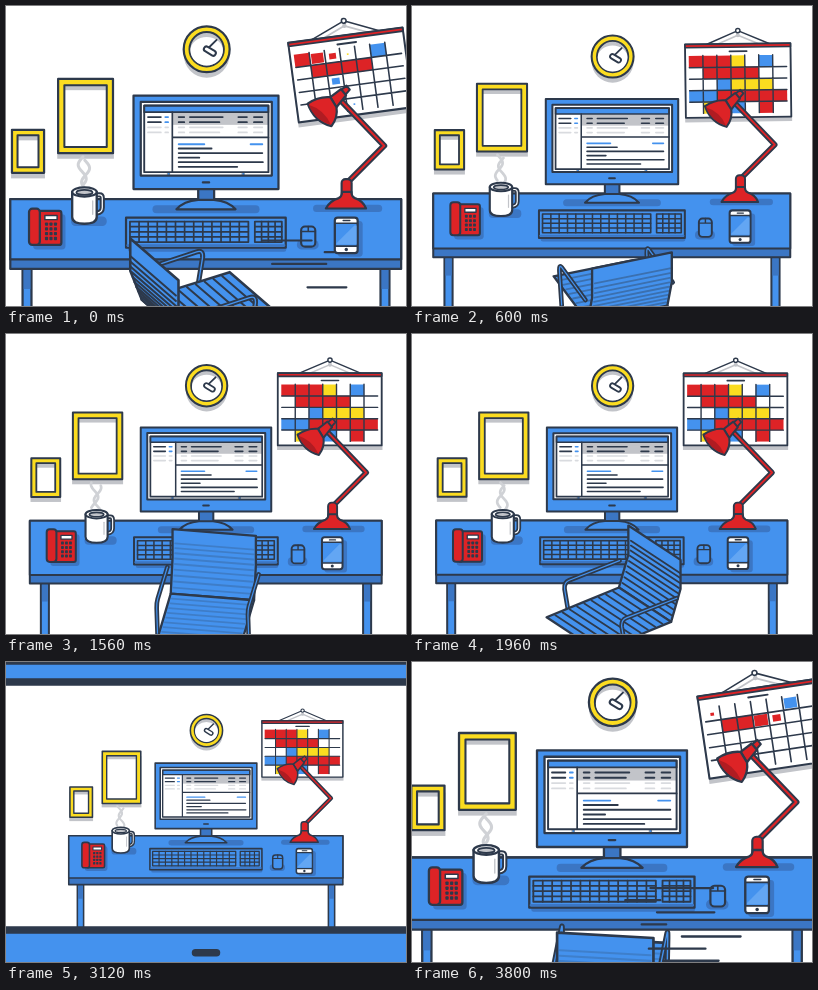
An HTML page for the animation above (3.88 s loop, 400 by 300 pixels).

```html
<!DOCTYPE html>
<html lang="en">
<head>
<meta charset="utf-8">
<title>Desk</title>
<style>
html, body { margin: 0; width: 100%; height: 100%; overflow: hidden; background: #fff; }
svg { display: block; width: 100vw; height: 100vh; }
</style>
</head>
<body>
<svg id="stage" viewBox="0 0 400 300"></svg>
<script>
// The camera pulls back out of a monitor that shows the same desk: NEST is the size of the desk on the screen
const LOOP = 3880, SWITCH = 2800, NEST = 0.2085, CX = 200, CY = 128;
const INK = '#2d394b', BLUE = '#4492ee', DEEP = '#3b76c4', RED = '#dd2326',
      YELLOW = '#fbdc20', GREY = '#c2c4c9', PALE = '#d9dbdf', WHITE = '#fff';
const HUES = { R: RED, B: BLUE, Y: YELLOW };

const clamp = (v, a = 0, b = 1) => Math.min(b, Math.max(a, v));
const mix = (a, b, p) => a + (b - a) * p;
const ease = (a, b, t) => { const p = clamp((t - a) / (b - a)); return p * p * (3 - 2 * p); };

function random(seed) {
  return () => (seed = seed * 16807 % 2147483647) / 2147483647;
}

// Monotone cubic through [time, value] keys
function curve(keys) {
  const n = keys.length - 1, slope = [], m = [0];
  for (let i = 0; i < n; i++)
    slope.push((keys[i + 1][1] - keys[i][1]) / (keys[i + 1][0] - keys[i][0]));
  for (let i = 1; i < n; i++) {
    const a = slope[i - 1], b = slope[i];
    m.push(a * b > 0 ? 2 * a * b / (a + b) : 0);
  }
  m.push(0);
  return t => {
    if (t <= keys[0][0]) return keys[0][1];
    if (t >= keys[n][0]) return keys[n][1];
    let i = 0;
    while (t > keys[i + 1][0]) i++;
    const h = keys[i + 1][0] - keys[i][0], p = (t - keys[i][0]) / h, q = 1 - p;
    return keys[i][1] * (1 + 2 * p) * q * q + keys[i + 1][1] * (3 - 2 * p) * p * p
      + h * (m[i] * p * q * q - m[i + 1] * p * p * q);
  };
}

// Motion; times are relative to the scene's own zero
const zoom = curve([[-1080, -Math.log(NEST)], [-760, 1.322], [-400, .329], [-80, .143],
  [0, .109], [600, .0184], [1200, .006], [2800, 0]]);
const swing = u => 9 * Math.exp(-(((u + 400) / 800) ** 4)) * Math.cos(Math.PI * (u + 400) / 350);
const unroll = u => ease(-620, -200, u);
const openWin = u => u < -640 ? 0 : 60 * (1 - Math.exp(-(u + 640) / 120));
const spin = u => (149 + (u < 0 ? .66 * u : 620 * (1 - Math.exp(-u / 1000)))) * Math.PI / 180;
const sink = u => 120 * (ease(2200, 2720, u) + 1 - ease(-760, -420, u));

// Drawing helpers
const box = (x, y, x2, y2, fill, line = 2, r = 0, more = '') =>
  `<rect x="${x}" y="${y}" width="${x2 - x}" height="${y2 - y}" rx="${r}" fill="${fill}"` +
  (line ? ` stroke="${INK}" stroke-width="${line}"` : '') + ` ${more}/>`;
const path = (d, fill = 'none', line = 2, color = INK, more = '') =>
  `<path d="${d}" fill="${fill}" stroke="${color}" stroke-width="${line}" ${more}/>`;
const disc = (x, y, r, fill, line = 2) =>
  `<circle cx="${x}" cy="${y}" r="${r}" fill="${fill}" stroke="${INK}" stroke-width="${line}"/>`;
const oval = (x, y, rx, ry, fill, line) =>
  `<ellipse cx="${x}" cy="${y}" rx="${rx}" ry="${ry}" fill="${fill}" stroke="${INK}" stroke-width="${line}"/>`;
const dash = (x, x2, y, color = INK, w = 1.6) => path(`M${x} ${y}H${x2}`, 'none', w, color);
const tube = (d, outer, core, color) => path(d, 'none', outer) + path(d, 'none', core, color);

function clock() {
  return `<circle cx="200.6" cy="57" r="20.6" fill="${GREY}"/>` + disc(200.6, 52, 20.6, YELLOW) +
    disc(200.6, 52, 15.4, GREY, 1.8) +
    `<path d="M186 53a14.6 12 0 0 1 29.2 0a14.5 13.5 0 0 1-29.2 0" fill="${WHITE}"/>` +
    path('M201 52L209.5 43.6', 'none', 1.7) + tube('M200.4 51.8L206.5 55.5', 6.4, 2.8, WHITE);
}

function frame(x, y, x2, y2, w) {
  return box(x - .8, y + 6, x2 + .8, y2 + 5, GREY, 0) + box(x, y, x2, y2, YELLOW) +
    box(x + w, y + w, x2 - w, y2 - w, WHITE, 0) +
    box(x + w, y + w, x2 - w, y + w + 4.5, GREY, 0) +
    box(x + w, y + w, x2 - w, y2 - w, 'none', 1.8);
}

const PLAN = ['RRRY.B.', '.RRRR..', '..BYYY.', 'BBRRRRR', '.YYB.R.'];
const ROW_START = [-100, -245, 95, 250, 100];

function calendar(id) {
  let cells = '', lines = '';
  PLAN.forEach((row, r) => [...row].forEach((c, i) => {
    if (c === '.') return;
    const at = ROW_START[r] + 30 * i - (c === 'B' ? 200 : 0);
    cells += `<rect class="cell" x="-7" y="-5.8" width="14" height="11.6" fill="${HUES[c]}"
      data-x="${282 + 13.7 * i}" data-y="${56.6 + 11.3 * r}" data-at="${at}"/>`;
  }));
  for (let i = 1; i < 7; i++) lines += `M${275.2 + 13.7 * i} 50.5V107.5`;
  for (let i = 1; i < 5; i++) lines += `M275.5 ${51 + 11.3 * i}H371`;
  return `<clipPath id="grid${id}"><rect class="gridclip" x="270" y="44" width="106" height="0"/></clipPath>` +
    '<g class="cal">' + path('M293 44L323.5 31L354 44', 'none', 1.6, GREY) + disc(323.5, 31, 2, GREY, 0) +
    path('M293 39.5L323.5 26.5L354 39.5', 'none', 1.4) + disc(323.5, 26.5, 2.1, WHITE, 1.4) +
    box(270.8, 44, 375.8, 44, GREY, 0, 0, 'class="paper"') +
    box(271.5, 39.5, 375, 39.5, WHITE, 1.8, 0, 'class="paper"') + cells +
    `<g clip-path="url(#grid${id})">${path(lines, 'none', 1.4)}</g>` +
    box(271.5, 39.5, 375, 42.7, RED, 1.6) + dash(315, 332, 46.8) + '</g>';
}

function desk() {
  const leg = x => box(x, 249, x + 8, 320, BLUE) + box(x + 1, 249, x + 7, 267, DEEP, 0);
  return leg(35.5) + leg(356.5) + box(24.5, 186.5, 375, 249, DEEP) + box(24.5, 186.5, 375, 240.5, BLUE);
}

function keyboard() {
  const block = (x, x2, n) => {
    let d = '';
    for (let i = 1; i < 4; i++) d += `M${x} ${206.5 + i * 4.6}H${x2}`;
    for (let i = 1; i < n; i++) d += `M${mix(x, x2, i / n)} 206.5V224.9`;
    return box(x, 206.5, x2, 224.9, BLUE, 1.6) + path(d, 'none', 1.5);
  };
  return box(130, 206, 272, 233.5, DEEP, 0, 2) + box(128.3, 203, 271.5, 230, BLUE) +
    path('M129.6 227.8H270.2', 'none', 2, DEEP) + block(131.8, 238, 13) + block(243.8, 268, 4);
}

function phone() {
  let keys = '';
  for (let r = 0; r < 4; r++)
    for (let c = 0; c < 3; c++) keys += box(55.6 + c * 4, 207.3 + r * 4.3, 58.4 + c * 4, 210.3 + r * 4.3, INK, 0, .7);
  return box(45, 200, 74, 231.5, DEEP, 0, 3) + box(47, 197, 70.3, 227.5, RED, 2, 2) +
    box(41.3, 195, 51, 227.5, RED, 2, 3) + box(55.5, 201, 66.5, 204.8, WHITE, 1.3) + keys;
}

function mug() {
  return box(79, 202, 111, 210.5, DEEP, 0, 4) + path('', 'none', 2.7, '#d0d2d6', 'class="steam"') +
    tube('M102 182.5h2.6q2.4 0 2.4 3v8.5q0 4.5-5 5', 4.6, 1.1, WHITE) +
    path('M80 180V202.5q0 6 11 6t11-6V180z', WHITE, 2.1) + path('M98.4 188V200', 'none', 1.2, GREY) +
    oval(91, 180, 11, 4.2, WHITE, 2) + oval(91, 180.4, 7.2, 2.2, GREY, 1.6);
}

function gadgets() {
  return box(281.5, 223, 301, 231.5, DEEP, 0, 4) + box(285.3, 211, 298, 229, BLUE, 1.9, 3.5) +
    path('M285.3 215.5H298M291.7 211V215.5', 'none', 1.4) +
    box(318, 206, 340.5, 238, DEEP, 0, 3) + box(315.5, 203, 336, 234.8, WHITE, 2, 2.6) +
    box(315.8, 208, 335.7, 228.5, BLUE, 1.5) + path('M317 226L333 210h2V227H317z', '#63a6f3', 0) +
    dash(323, 329, 205.6, INK, 1.3) + disc(325.8, 231.6, 1.5, INK, 0);
}

function lamp() {
  return box(296, 191.5, 358, 198, DEEP, 0, 3.2) + tube('M326.3 172L359.8 138.5L321 98', 5.4, 1.9, RED) +
    box(321.6, 168.5, 330.6, 188, RED, 1.9, 3.5) +
    path('M307.5 194.8Q311 188 319 185.5Q322 184 322 180H330.4Q330.4 184 333.5 185.5Q341 188 343.5 194.8z', RED) +
    path('M320 89.5L326 84.6L329 88.2L324 94z', RED, 1.8) +
    path('M311.5 95L321 87.7L325.6 93.2L317 104z', RED) +
    path('M291.2 100.7Q301 94 311.5 95L317 104Q318.5 113 312.5 121Q297 117 291.2 100.7z', RED) +
    path('M292 101.8Q306 106 312 119.8Q298 116 292 101.8z', '#b01c22', 0);
}

function mail() {
  let s = box(145, 108.5, 256, 165, WHITE, 0) + box(169.8, 109, 256, 119.8, GREY, 0) +
    box(144.6, 102.5, 256, 108.4, BLUE, 1.5);
  for (let i = 0; i < 4; i++) {
    const y = 112.8 + 4.6 * i, c = i < 2 ? INK : PALE;
    s += dash(148, 159.5, y, c) + dash(163.5, 166, y, i < 2 ? BLUE : PALE) + dash(175.5, 180.5, y, c) +
      dash(185.6, i % 2 ? 212 : 215, y, c) + dash(229, 236.7, y, c) + dash(243, 250.5, y, c);
  }
  s += path('M169.8 108.4V165M169.8 131H256', 'none', 1.5) +
    dash(175.5, 198.5, 137.2, BLUE) + dash(240, 250.5, 137.2, BLUE);
  [205, 250.5, 194, 251, 228].forEach((x, i) => s += dash(175.5, x, 141 + i * 4.1));
  return s;
}

function monitor(id, nested) {
  return box(152, 192, 248, 199, DEEP, 0, 3.5) + box(193, 176, 207.3, 190, DEEP) +
    path('M173.5 195.5Q180 188 193 187H207Q220 188 226.5 195.5z', BLUE) +
    box(135, 93.6, 265, 177.4, BLUE) + box(141.5, 99.2, 259, 165.3, WHITE, 0) +
    `<clipPath id="screen${id}"><rect x="141.5" y="99.2" width="117.5" height="66.1"/></clipPath>` +
    `<clipPath id="win${id}"><rect class="view" x="143" y="101" width="114.5" height="0"/></clipPath>` +
    `<g clip-path="url(#screen${id})"><g transform="translate(${CX} ${CY}) scale(${NEST}) translate(${-CX} ${-CY})">${nested}</g>` +
    `<g clip-path="url(#win${id})">${mail()}</g>` + box(144.6, 102.5, 256, 103, 'none', 1.7, 0, 'class="edge"') + '</g>' +
    box(141.5, 99.2, 259, 165.3, 'none') + path('M197.2 171.4H202.8', 'none', 2);
}

const scene = (id, nested) =>
  clock() + frame(67.4, 78.6, 116.6, 145.2, 5.6) + frame(26, 124.2, 54.8, 162.8, 5) + calendar(id) +
  desk() + monitor(id, nested) + keyboard() + phone() + mug() + gadgets() + lamp() +
  '<g class="chair"></g>' + path('', 'none', 2, INK, 'class="dashes"');

// Swivel chair: a points to its back, b across it, z up from the seat
function chair(u) {
  const turn = spin(u), cos = Math.cos(turn), sin = Math.sin(turn), drop = sink(u);
  const at = (a, b, z) => [200 + a * cos - b * sin, 284 + drop + .52 * (a * sin + b * cos) - z];
  const line = pts => 'M' + pts.map(p => p.map(v => v.toFixed(2)).join(' ')).join('L');
  const half = 42, strength = clamp(cos * cos * 1.8);

  const panel = (point, from, count) => {
    let ribs = '';
    for (let k = from; k < count; k++) ribs += line([point(k / count, -half * .94), point(k / count, half * .94)]);
    const edge = line([point(0, -half), point(0, half), point(.5, half), point(1, half),
      point(1, -half), point(.5, -half)]) + 'z';
    return path(edge, BLUE, 2.3) + path(ribs, 'none', 1.8, INK, `opacity="${mix(.2, 1, strength)}"`);
  };
  const back = panel((p, b) => at(mix(54, 42, p) + 6 * Math.sin(p * Math.PI), b, 58 * (1 - p)), 3, 12);
  const seat = panel((p, b) => at(mix(42, -50, p), b, 0), 1, 10);
  const arm = side => {
    const b = side * 46;
    return tube(line([at(46, b, 24), at(-18, b, 25)]) + `Q${at(-25, b, 25)} ${at(-24, b, 18)}L${at(-18, b, -12)}`, 4.6, 1.2, BLUE);
  };
  const far = cos > 0 ? -1 : 1;
  return sin < 0 ? arm(far) + back + seat + arm(-far) : arm(far) + seat + arm(-far) + back;
}

// Speed lines fly right; the head slows down while the tail catches up
function streaks(u) {
  const rnd = random(77);
  let d = '';
  for (let i = 0; i < 7; i++) {
    const y = 213 + 10.5 * i, a = mix(200, 225, rnd()), b = mix(305, 342, rnd());
    const p = (u - mix(-190, -100, rnd())) / 170;
    if (p > 0 && p < 1) d += `M${mix(a, b, p * p)} ${y}H${mix(a, b, 1 - (1 - p) ** 2)}`;
  }
  return d;
}

function steam(t) {
  let d = '';
  for (const side of [-1, 1])
    for (let y = 175; y >= 150; y--) {
      const x = 90.5 + side * (1.5 + 3.6 * Math.sin(y / 4 + t / LOOP * Math.PI * 6));
      d += `${y === 175 ? 'M' : 'L'}${x.toFixed(2)} ${y + side * 1.5}`;
    }
  return d;
}

const stage = document.getElementById('stage');
stage.innerHTML = `<rect width="400" height="300" fill="${WHITE}"/>` +
  `<g id="outer" stroke-linecap="round" stroke-linejoin="round">${scene('A', '<g id="inner">' + scene('B', '') + '</g>')}</g>`;
const outer = document.getElementById('outer'), inner = document.getElementById('inner');

function parts(nested) {
  const all = c => [...outer.querySelectorAll('.' + c)].filter(e => inner.contains(e) === nested);
  const found = { cells: all('cell'), papers: all('paper') };
  for (const c of ['cal', 'gridclip', 'steam', 'view', 'edge', 'chair', 'dashes']) found[c] = all(c)[0];
  return found;
}
const near = parts(false), far = parts(true);

function update(e, u, t) {
  e.cal.setAttribute('transform', `rotate(${swing(u)} 323.5 26.5)`);
  const fall = unroll(u);
  for (const p of e.papers) p.setAttribute('height', 72 * fall);
  e.gridclip.setAttribute('height', 64 * clamp(fall * 1.8 - .7));
  for (const c of e.cells) {
    const k = clamp((u - c.dataset.at) / 90);
    c.setAttribute('transform', `translate(${c.dataset.x} ${c.dataset.y}) scale(${k})`);
  }
  const h = openWin(u);
  e.view.setAttribute('height', h ? h + 1.5 : 0);
  e.edge.setAttribute('height', h);
  e.edge.style.display = h ? '' : 'none';
  e.steam.setAttribute('d', steam(t));
  e.chair.innerHTML = u < 2720 ? chair(u) : '';
  e.dashes.setAttribute('d', streaks(u));
}

function draw(t) {
  const u = t < SWITCH ? t : t - LOOP;
  outer.setAttribute('transform', `translate(${CX} ${CY}) scale(${Math.exp(zoom(u))}) translate(${-CX} ${-CY})`);
  update(near, u, t);
  update(far, u + LOOP, t);
}

let start = null;
function tick(now) {
  if (start === null) start = now;
  draw((now - start) % LOOP);
  requestAnimationFrame(tick);
}
draw(0);
requestAnimationFrame(tick);
</script>
</body>
</html>
```
